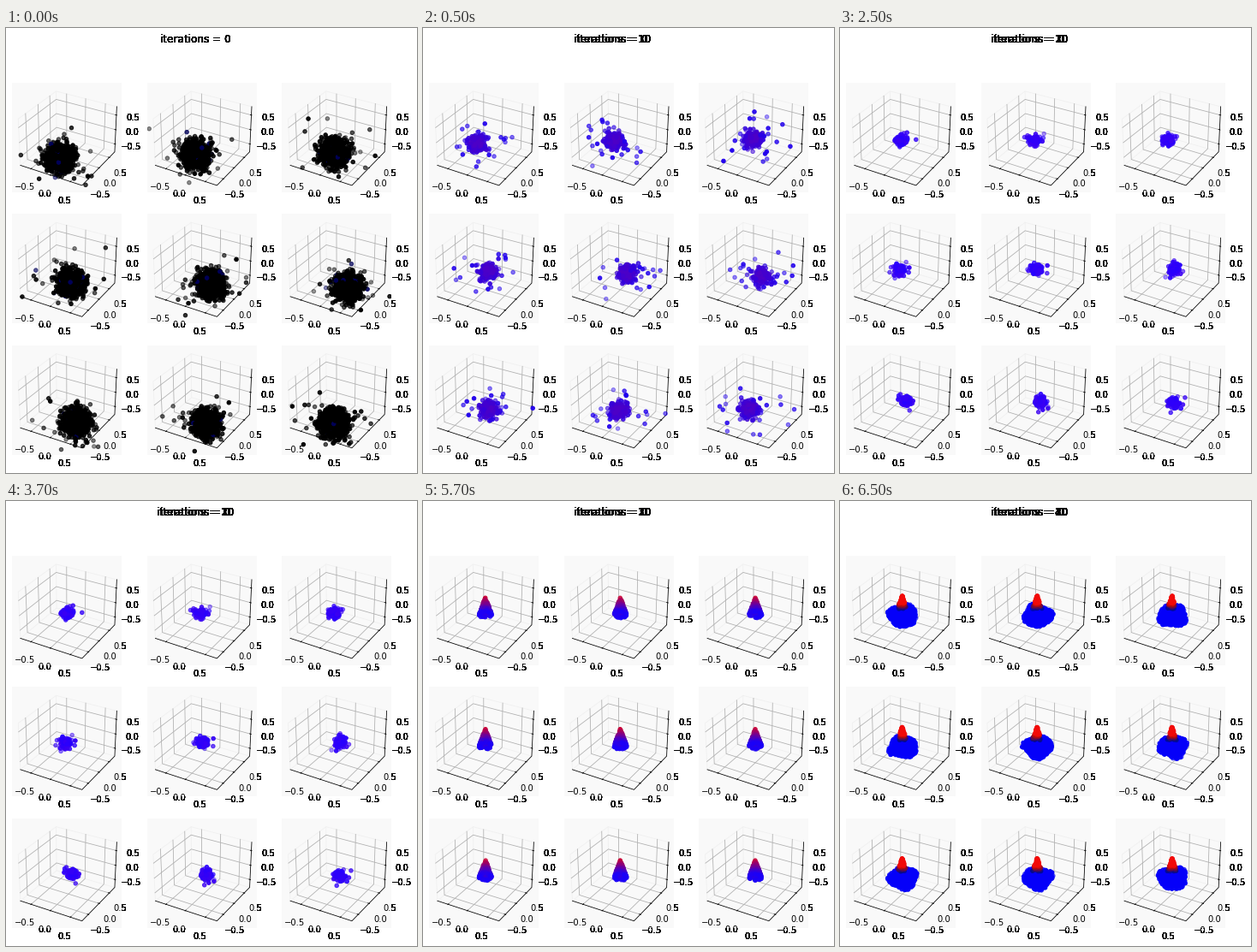
Animation of 480x520 px, one loop 8 s. Source, as a matplotlib script:

```python
import numpy as np
import matplotlib.pyplot as plt
from matplotlib.animation import FuncAnimation
from matplotlib.patches import Rectangle

W, H, DPI = 480, 520, 72
SIDE = 128                      # panel size in pixels
LIM, BOX = 0.75, 0.78125        # data limit and padded box limit
LABEL = BOX + 0.27              # where tick labels sit
TICKS = (-0.5, 0.0, 0.5)
OVERDRAW = 12                   # text piled up by redrawing on the same canvas
INTERVAL = 500
STARTS = (0, 1, 5, 9, 13)       # animation step at which each stage begins

PANELS = [(7.2 + 157.6 * c, 64 + 153.4 * r) for r in range(3) for c in range(3)]


def project(x, y, z, panel):
    """Perspective view at elevation 30, azimuth -60, in stage pixels."""
    p = np.array([x, y, z]) * np.array([8, 8, 6]) / 7 / (2 * LIM)
    s = np.sqrt(3) / 2
    right = p @ (s, 0.5, 0)
    up = p @ (-0.25, s / 2, s)
    depth = 10 - p @ (s / 2, -0.75, 0.5)
    scale = SIDE / 0.185
    return (panel[0] + (right / depth + 0.095) * scale,
            panel[1] + SIDE - (up / depth + 0.095) * scale)


plt.rcParams["font.family"] = "DejaVu Sans"
fig = plt.figure(figsize=(W / DPI, H / DPI), dpi=DPI, facecolor="white")
ax = fig.add_axes([0, 0, 1, 1])
ax.set(xlim=(0, W), ylim=(H, 0))
ax.axis("off")


def path(panel, corners, color, zorder):
    xs, ys = zip(*(project(*c, panel) for c in corners))
    ax.plot(xs, ys, color=color, lw=0.8, zorder=zorder,
            solid_capstyle="projecting")


def tick_label(panel, point, value):
    x, y = project(*point, panel)
    text = f"{value:.1f}".replace("-", "\u2212")
    # The panel patch hides all but the last copy inside it
    for zorder in [1] * OVERDRAW + [5]:
        ax.text(x + 0.6, y + 0.8, text, size=10, ha="center", va="top",
                zorder=zorder)


def draw_panel(panel):
    b, t_in, t_out = BOX, BOX - 0.025, BOX + 0.0125
    patch = ax.add_patch(Rectangle(panel, SIDE, SIDE, fc="#f9f9f9", lw=0,
                                   zorder=2))
    for edge in ([(-b, -b, -b), (-b, -b, b), (-b, b, b), (b, b, b)],
                 [(-b, -b, -b), (-b, b, -b), (b, b, -b)],
                 [(-b, b, -b), (-b, b, b)]):
        path(panel, edge, "#f0f0f0", 2.5)
    for v in TICKS:
        path(panel, [(v, -b, -b), (v, b, -b), (v, b, b)], "#b0b0b0", 3)
        path(panel, [(b, v, -b), (-b, v, -b), (-b, v, b)], "#b0b0b0", 3)
        path(panel, [(-b, -b, v), (-b, b, v), (b, b, v)], "#b0b0b0", 3)
        path(panel, [(v, -t_in, -b), (v, -t_out, -b)], "black", 4)
        path(panel, [(t_in, v, -b), (t_out, v, -b)], "black", 4)
        path(panel, [(t_in, b, v), (t_out, b, v)], "black", 4)
        tick_label(panel, (v, -LABEL, -LABEL), v)
        tick_label(panel, (LABEL, v, -LABEL), v)
        tick_label(panel, (LABEL, LABEL, v), v)
    path(panel, [(-b, -b, -b), (b, -b, -b), (b, b, -b), (b, b, b)], "black", 4)
    return patch


def rgba(rgb, alpha):
    return np.column_stack([np.clip(rgb, 0, 1), alpha])


def orbit(i, center, radius, phase):
    """Cloud centre, circling slowly from one panel to the next."""
    a = 2 * np.pi * (i - phase) / len(PANELS)
    return np.add(PANELS[i], center) - np.multiply(radius, (np.cos(a), np.sin(a)))


def cloud(rng, center, strays, stray_sd, core, core_sd):
    """Loose points first, then the dense core, with depth-like opacity."""
    xy = np.vstack([rng.normal(center, stray_sd, (strays, 2)),
                    rng.normal(center, core_sd, (core, 2))])
    alpha = np.sort(rng.uniform(0.5, 1, strays + core))
    alpha[:strays] = rng.uniform(0.4, 1, strays)
    return xy, alpha


def wide_cloud(rng, i):
    center = orbit(i, (66.5, 86), (10.5, 5.8), 0.5)
    xy, alpha = cloud(rng, center, 36, (20, 16), 1000, 7.4)
    rgb = np.zeros((len(xy), 3))
    rgb[rng.random(len(xy)) < 0.02, 2] = 0.35
    return xy, rgba(rgb, alpha)


def tight_cloud(rng, i):
    center = orbit(i, (65, 71), (8.5, 5), 0)
    xy, alpha = cloud(rng, center, 26, (18, 12), 170, (5, 4.8))
    spread = np.linalg.norm(xy - center, axis=1)
    mix = np.clip(1.2 - spread / 16 + rng.normal(0, 0.15, len(xy)), 0, 1)
    rgb = np.column_stack([0.13 + 0.17 * mix, 0 * mix, 0.93 - 0.15 * mix])
    return xy, rgba(rgb, alpha)


def knot(rng, i):
    center = orbit(i, (65.5, 66), (4.5, 1.8), 2)
    xy, alpha = cloud(rng, center, 14, (5.5, 4.5), 110, (2.9, 2.7))
    mix = rng.random(len(xy))
    rgb = np.column_stack([0.15 + 0.08 * mix, 0 * mix, 1 - 0.05 * mix])
    return xy, rgba(rgb, alpha)


def cone(rng, i):
    n = 150
    x0, y0 = np.add(PANELS[i], (65.7, 49.3))
    t = np.sqrt(np.linspace(0, 1, n))
    angle = rng.uniform(0, 2 * np.pi, n)
    x = x0 + (0.3 + 7.2 * t) * np.cos(angle)
    y = y0 + 20 * t + 3.4 * t * np.sin(angle)
    rgb = np.column_stack([0.8 - 0.7 * t, 0 * t, 0.2 + 0.78 * t])
    return np.column_stack([x, y]), rgba(rgb, rng.uniform(0.7, 1, n))


def spike(rng, i):
    n, m = 420, 70
    angle = rng.uniform(0, 2 * np.pi, n)
    p3, p4 = rng.uniform(0, 2 * np.pi, 2)
    rim = 1 + 0.08 * np.sin(3 * angle + p3) + 0.08 * np.sin(4 * angle + p4)
    r = np.sqrt(rng.random(n)) * rim
    skirt = np.add(PANELS[i], (66.2, 70)) + np.column_stack(
        [16.5 * r * np.cos(angle), 12.8 * r * np.sin(angle)])
    blue = np.tile([0.02, 0.0, 0.98], (n, 1))

    x0, y0 = np.add(PANELS[i], (65.4, 47))
    t = np.linspace(1, 0, m)
    peak = np.column_stack([x0 + (0.3 + 5.5 * t) * rng.uniform(-1, 1, m),
                            y0 + 15 * t])
    rgb = np.column_stack([np.clip(1 - (t - 0.5) / 0.45, 0, 0.95),
                           0 * t + 0.04,
                           np.clip((t - 0.6) * 1.6, 0.03, 1)])
    return (np.vstack([skirt, peak]),
            np.vstack([rgba(blue, rng.uniform(0.5, 1, n)),
                       rgba(rgb, rng.uniform(0.7, 1, m))]))


patches = [draw_panel(panel) for panel in PANELS]
stages = []
for k, make in enumerate((wide_cloud, tight_cloud, knot, cone, spike)):
    scatters = []
    for i, patch in enumerate(patches):
        xy, colors = make(np.random.default_rng(100 * k + i), i)
        dots = ax.scatter(*xy.T, s=20, c=colors, linewidths=1, zorder=6)
        dots.set_clip_path(patch)
        scatters.append(dots)
    titles = [ax.text(221.4, 17, f"iterations = {10 * k}", size=12,
                      ha="center", va="baseline", zorder=7)
              for _ in range(OVERDRAW)]
    stages.append((scatters, titles))


def update(step):
    stage = sum(step >= s for s in STARTS) - 1
    for k, (scatters, titles) in enumerate(stages):
        for dots in scatters:
            dots.set_visible(k == stage)
        for title in titles:        # earlier titles are never erased
            title.set_visible(k <= stage)
    return []


anim = FuncAnimation(fig, update, frames=16, interval=INTERVAL,
                     repeat=True, repeat_delay=0, init_func=lambda: update(0))
plt.show()
```
